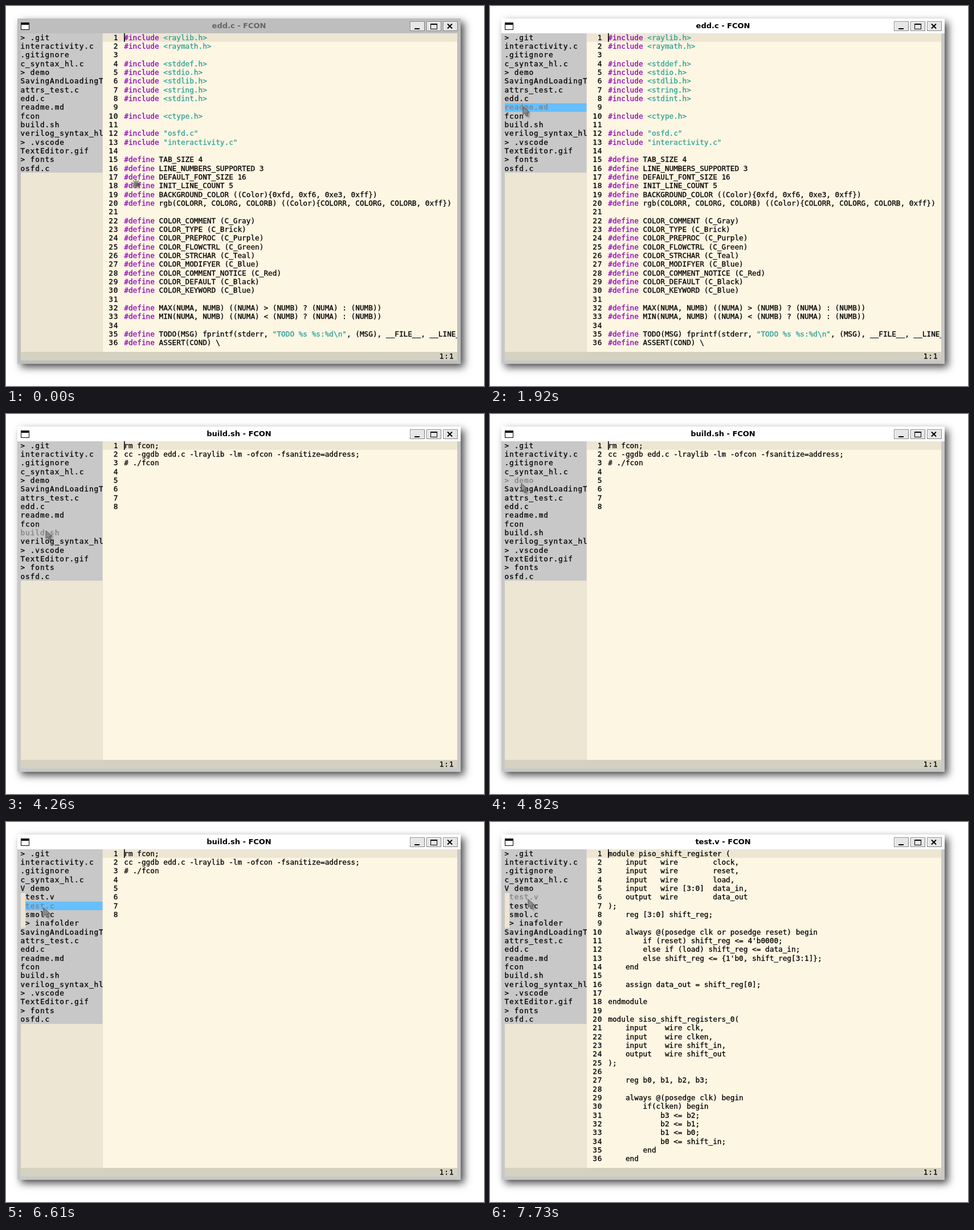
Recreate the animation shown at these times as an HTML page with a canvas. Size 839x668 px, loop 8000 ms.

```html
<!DOCTYPE html>
<html lang="en">
<head>
<meta charset="utf-8">
<title>Text editor</title>
<style>
  html, body { margin: 0; width: 100%; height: 100%; overflow: hidden; background: #fff; }
  canvas { display: block; }
</style>
</head>
<body>
<canvas id="stage" width="839" height="668"></canvas>
<script>
const ctx = document.getElementById('stage').getContext('2d');
const LOOP = 8000;
const ROW = 15.34, CELL = 7.66, WIDE = 8.6, TOP = 48, BASE = 59.5;
const MONO = '"DejaVu Sans Mono", "Liberation Mono", monospace';
const INK = { text: '#000', gray: '#929292', purple: '#8c00b4', teal: '#2aa198',
              blue: '#0074e8', brick: '#c8320a', red: '#dc0a14' };

const toLines = s => s.slice(1, -1).split('\n');
const tableRow = ([a, b]) => `| ${a.padEnd(16)} | ${b.padEnd(19)} |`;

const EDD = toLines(String.raw`
#include <raylib.h>
#include <raymath.h>

#include <stddef.h>
#include <stdio.h>
#include <stdlib.h>
#include <string.h>
#include <stdint.h>

#include <ctype.h>

#include "osfd.c"
#include "interactivity.c"

#define TAB_SIZE 4
#define LINE_NUMBERS_SUPPORTED 3
#define DEFAULT_FONT_SIZE 16
#define INIT_LINE_COUNT 5
#define BACKGROUND_COLOR ((Color){0xfd, 0xf6, 0xe3, 0xff})
#define rgb(COLORR, COLORG, COLORB) ((Color){COLORR, COLORG, COLORB, 0xff})

#define COLOR_COMMENT (C_Gray)
#define COLOR_TYPE (C_Brick)
#define COLOR_PREPROC (C_Purple)
#define COLOR_FLOWCTRL (C_Green)
#define COLOR_STRCHAR (C_Teal)
#define COLOR_MODIFYER (C_Blue)
#define COLOR_COMMENT_NOTICE (C_Red)
#define COLOR_DEFAULT (C_Black)
#define COLOR_KEYWORD (C_Blue)

#define MAX(NUMA, NUMB) ((NUMA) > (NUMB) ? (NUMA) : (NUMB))
#define MIN(NUMA, NUMB) ((NUMA) < (NUMB) ? (NUMA) : (NUMB))

#define TODO(MSG) fprintf(stderr, "TODO %s %s:%d\n", (MSG), __FILE__, __LINE__)
#define ASSERT(COND) \
`);

const README = [
  '# Yet another text editor', '', '## Controls', '',
  ...[['Key Combo', 'Action'], ['-'.repeat(16), '-'.repeat(19)],
    ['CTRL + S', 'Save'], ['CTRL + SHIFT + S', 'Save as'], ['CTRL + O', 'Open'],
    ['CTRL + LEFT', 'Move Left a word'], ['CTRL + RIGHT', 'Move Right a word'],
    ['CTRL + Plus', 'Zoom in'], ['CTRL + Minuse', 'Zoom Out'],
    ['ALT + UP', 'Move line up'], ['ALT + DOWN', 'Move Line Down'],
    ['SHIFT + ARROW', 'Select'], ['CTRL + C', 'Copy Line/Selection'],
    ['CTRL + X', 'Cut Line/Selection'], ['CTRL + V', 'Paste']].map(tableRow),
  '', '## What my TODO stuff is',
  '- CTRL_F : Find and Replace, got some ui, not any logic', ''
];

const BUILD = ['rm fcon;', 'cc -ggdb edd.c -lraylib -lm -ofcon -fsanitize=address;',
  '# ./fcon', '', '', '', '', ''];

const TEST_C = toLines(`
/* and this one is small but big */ size_t i_should_highlight = 0;
int i = 0;   /*turkies are known for there int and size_t usage */

/*
 * this is a comment with some keywords for testing that the highlighting
 * is disabled while we are in multi-line comments.
 */

// WARNING: Turkies are evil, they eat bugs
// NOTICE: Only bugs think that
// TODO: Tell the bug that they are evil
// The fourth line
// the fifith comment


#include <SomethingSpicy.h>
#include "test header with space.h"


extern double
const char
struct{
    float  f;
    double d;
} s;


// @brief Entrypoint
// @param argc count of argv
// @param argv arguments passed into this program
int main(int argc, char *argv[]) {

}

const char *something = "I am a string!";
int something = 0; // I am a comment!
`);

const TEST_V = toLines(`
module piso_shift_register (
    input   wire        clock,
    input   wire        reset,
    input   wire        load,
    input   wire [3:0]  data_in,
    output  wire        data_out
);
    reg [3:0] shift_reg;

    always @(posedge clk or posedge reset) begin
        if (reset) shift_reg <= 4'b0000;
        else if (load) shift_reg <= data_in;
        else shift_reg <= {1'b0, shift_reg[3:1]};
    end

    assign data_out = shift_reg[0];

endmodule

module siso_shift_registers_0(
    input    wire clk,
    input    wire clken,
    input    wire shift_in,
    output   wire shift_out
);

    reg b0, b1, b2, b3;

    always @(posedge clk) begin
        if(clken) begin
            b3 <= b2;
            b2 <= b1;
            b1 <= b0;
            b0 <= shift_in;
        end
    end
`);

const FILES = ['> .git', 'interactivity.c', '.gitignore', 'c_syntax_hl.c', '> demo',
  'SavingAndLoadingTest.gif', 'attrs_test.c', 'edd.c', 'readme.md', 'fcon', 'build.sh',
  'verilog_syntax_hl.c', '> .vscode', 'TextEditor.gif', '> fonts', 'osfd.c'];
const OPENED = [...FILES.slice(0, 4), 'V demo', ' test.v', ' test.c', ' smol.c',
  ' > inafolder', ...FILES.slice(5)];

// Split a C line into coloured runs; returns true while a block comment stays open.
const TOKEN = /(\/\*.*?(?:\*\/|$)|\/\/.*)|(#\w+)|("[^"]*"|<[\w.]+>)|\b(extern|const|struct)\b|\b(int|char|float|double|size_t)\b/g;
function scan(line, open, out) {
  const put = (at, s, color) => out.push([at, s, color]);
  const comment = (at, s) => {
    put(at, s, INK.gray);
    for (const m of s.matchAll(/WARNING:|NOTICE:|TODO:|@\w+/g)) put(at + m.index, m[0], INK.red);
  };
  if (open) {
    comment(0, line);
    return !line.includes('*/');
  }
  put(0, line, INK.text);
  for (const m of line.matchAll(TOKEN)) {
    if (m[1]) {
      comment(m.index, m[1]);
      open = m[1].startsWith('/*') && !m[1].endsWith('*/');
    } else {
      put(m.index, m[0], m[2] ? INK.purple : m[3] ? INK.teal : m[4] ? INK.blue : INK.brick);
    }
  }
  return open;
}

// One {char, color} cell per column, later runs covering earlier ones.
function layout(lines, isC) {
  let open = false;
  return lines.map(line => {
    const runs = [[0, line, INK.text]];
    if (isC) open = scan(line, open, runs);
    const colors = [];
    for (const [at, s, color] of runs) colors.fill.call(colors, color);
    for (const [at, s, color] of runs)
      for (let i = 0; i < s.length; i++) colors[at + i] = color;
    return { line, colors };
  });
}

const doc = (name, lines, isC) => ({ name, rows: layout(lines, isC) });
const DOCS = [
  [0, doc('edd.c', EDD, true)],
  [1950, doc('readme.md', README)],
  [3550, doc('build.sh', BUILD)],
  [6640, doc('test.c', TEST_C, true)],
  [7700, doc('test.v', TEST_V)]
];
const PRESSES = [[900, 1080], [1850, 1950], [3460, 3550], [4960, 5130], [6440, 6640], [7600, 7700]];
const FOCUS = 840, ARROW = 600, UNFOLD = 5130;

// Pointer keys: time, x, y
const PATH = [
  [0, 220, 303], [30, 220, 303], [270, 17, 116], [400, 36, 160], [1300, 37, 161],
  [1580, 58, 177], [2620, 58, 177], [2940, 69, 202], [3080, 69, 202], [3120, 70, 205],
  [4260, 70, 205], [4820, 55, 122], [5390, 55, 122], [5710, 66, 136], [6080, 66, 136],
  [6170, 67, 153], [6440, 67, 153], [6680, 66, 151], [6950, 66, 151], [7330, 67, 136], [LOOP, 67, 136]
];

function pointer(t) {
  const i = PATH.findIndex(k => k[0] > t);
  const [t0, x0, y0] = PATH[i - 1], [t1, x1, y1] = PATH[i];
  const u = (t - t0) / (t1 - t0), e = u * u * (3 - 2 * u);
  return [Math.round(x0 + (x1 - x0) * e), Math.round(y0 + (y1 - y0) * e)];
}

function box(x, y, w, h, color) {
  ctx.fillStyle = color;
  ctx.fillRect(x, y, w, h);
}

function path(points, close) {
  ctx.beginPath();
  for (let i = 0; i < points.length; i += 2) ctx.lineTo(points[i], points[i + 1]);
  if (close) ctx.closePath();
}

// Draw on a fixed character grid with a slightly heavy weight.
function grid(s, x, y, step, color) {
  ctx.lineWidth = 0.3;
  for (let i = 0; i < s.length; i++) {
    if (s[i] === ' ') continue;
    ctx.fillStyle = ctx.strokeStyle = Array.isArray(color) ? color[i] : color;
    ctx.fillText(s[i], x + i * step, y);
    ctx.strokeText(s[i], x + i * step, y);
  }
}

function drawFrame(name, focused) {
  ctx.save();
  ctx.shadowColor = 'rgba(0,0,0,.7)';
  ctx.shadowBlur = 13;
  ctx.shadowOffsetX = ctx.shadowOffsetY = 6;
  box(20, 22, 778, 607, focused ? '#c8c8c8' : '#bebebe');
  ctx.restore();
  if (focused) box(20, 22, 778, 26, '#fff');

  ctx.font = 'bold 13px "DejaVu Sans", Verdana, sans-serif';
  ctx.textAlign = 'center';
  ctx.fillStyle = focused ? '#000' : '#666';
  ctx.fillText(`${name} - FCON`, 409, 39);
  ctx.textAlign = 'left';

  box(26, 29, 15, 13, '#000');
  box(27, 33, 13, 8, '#fff');

  for (const x of [709, 738, 767]) {
    box(x, 27, 26, 17, '#868686');
    box(x + 1, 28, 24, 15, '#e6e6e6');
    box(x + 1, 28, 23, 1, '#fff');
    box(x + 1, 28, 1, 14, '#fff');
  }
  box(717, 39, 9, 2, '#000');
  box(745, 31, 12, 10, '#000');
  box(746, 33, 10, 7, '#e6e6e6');
  ctx.strokeStyle = '#000';
  ctx.lineWidth = 2;
  path([775, 31.5, 783, 39.5]); ctx.stroke();
  path([783, 31.5, 775, 39.5]); ctx.stroke();
}

function drawFiles(files, hover, pressed) {
  box(26, TOP, 143.5, 560, '#ede6d3');
  ctx.save();
  ctx.beginPath();
  ctx.rect(20, TOP, 150, 560);
  ctx.clip();
  files.forEach((name, i) => {
    const left = name[0] === ' ' ? 34 : 26, y = Math.round(TOP + i * ROW);
    const h = Math.round(TOP + (i + 1) * ROW) - y;
    box(left, y, 169.5 - left, h, i === hover && pressed ? '#66bfff' : '#c8c8c8');
    grid(name, 25.5, BASE + i * ROW, WIDE, i === hover ? '#808080' : '#000');
  });
  ctx.restore();
}

function drawEditor(rows) {
  box(169.5, TOP, 622.5, 560, '#fdf6e3');
  box(169.5, TOP, 622.5, 15, '#ede6d3');
  box(26, 608, 766, 15, '#d5d1c0');
  ctx.save();
  ctx.beginPath();
  ctx.rect(169, TOP, 623, 575);
  ctx.clip();
  rows.forEach(({ line, colors }, i) => {
    const y = BASE + i * ROW;
    grid(line, 207.3, y, CELL, colors);
    grid(String(i + 1).padStart(2), 180.2, y, WIDE, '#000');
  });
  box(207, TOP, 1.6, 15, '#000');
  grid('1:1', 760.7, 619.5, WIDE, '#000');
  ctx.restore();
}

function drawPointer(x, y, busy) {
  ctx.save();
  ctx.translate(x, y);
  ctx.shadowColor = 'rgba(0,0,0,.35)';
  ctx.shadowBlur = 3;
  ctx.shadowOffsetX = ctx.shadowOffsetY = 3;
  if (busy) {
    ctx.translate(8, 9);
    ctx.strokeStyle = 'rgba(112,134,108,.85)';
    ctx.lineWidth = 2.2;
    for (let a = 0; a < 4; a++) {
      const c = 7 * Math.cos(a * Math.PI / 4), s = 7 * Math.sin(a * Math.PI / 4);
      path([-c, -s, c, s]);
      ctx.stroke();
    }
  } else {
    path([0, 0, 0, 14, 3.4, 11, 6.2, 17, 9, 15.8, 6.3, 10, 11, 10], true);
    ctx.fillStyle = 'rgba(140,140,140,.9)';
    ctx.fill();
    ctx.shadowColor = 'transparent';
    ctx.strokeStyle = '#505050';
    ctx.lineWidth = 1;
    ctx.stroke();
  }
  ctx.restore();
}

function draw(t) {
  const current = DOCS.filter(d => d[0] <= t).pop()[1];
  const files = t < UNFOLD ? FILES : OPENED;
  const pressed = PRESSES.some(([a, b]) => t >= a && t < b);
  const [x, y] = pointer(t);
  const hover = x >= 26 && x < 169 ? Math.floor((y - TOP) / ROW) : -1;

  box(0, 0, 839, 668, '#fff');
  drawFrame(current.name, t >= FOCUS);
  ctx.font = `12.72px ${MONO}`;
  drawEditor(current.rows);
  drawFiles(files, hover, pressed);
  drawPointer(x, y, t < ARROW);
}

const start = performance.now();
function tick() {
  draw((performance.now() - start) % LOOP);
  requestAnimationFrame(tick);
}
tick();
</script>
</body>
</html>
```
